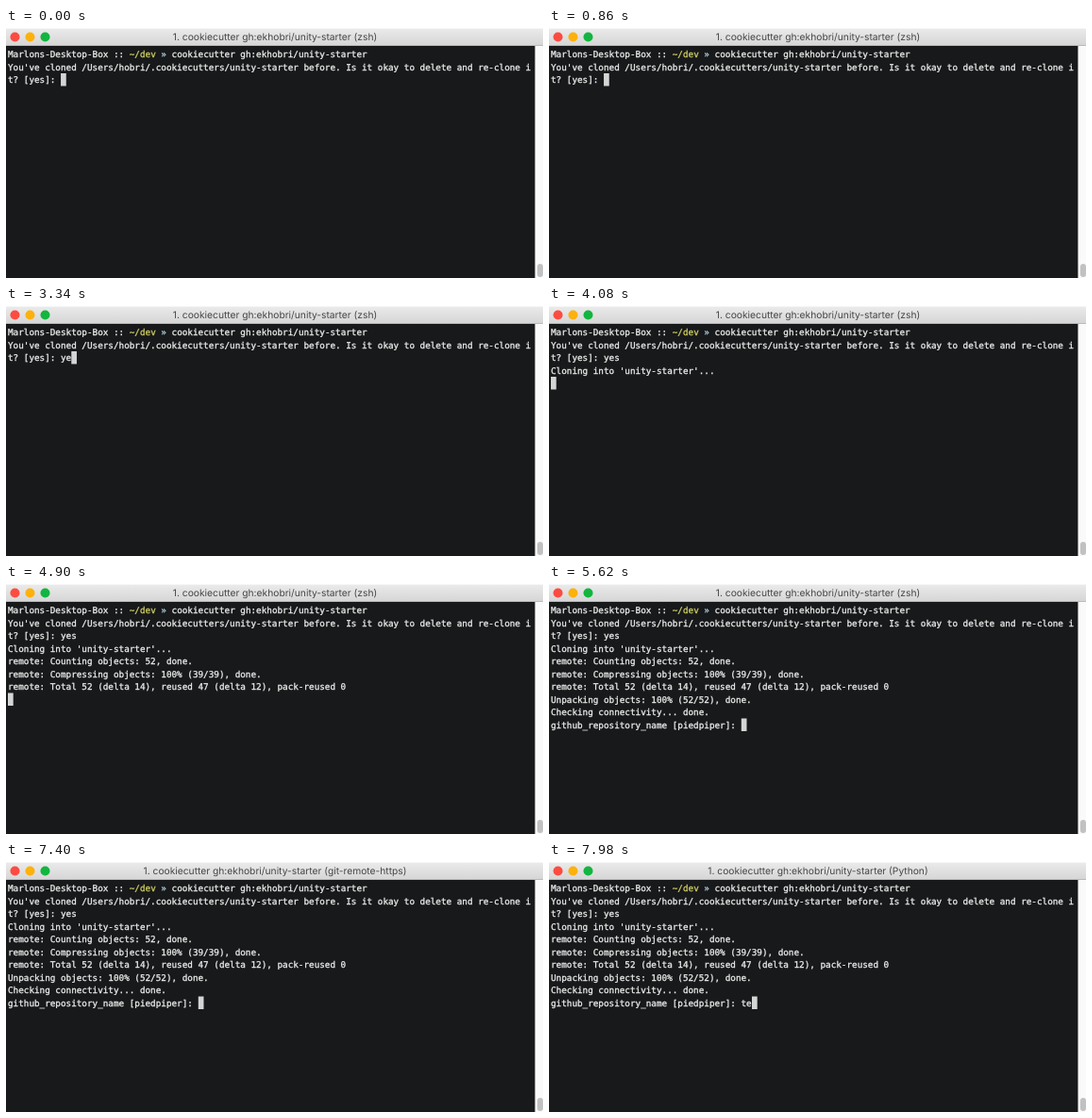
Animation of 569 by 265 pixels, one loop 8 s. Source, as an HTML page:

```html
<!DOCTYPE html>
<html lang="en">
<head>
<meta charset="utf-8">
<title>Terminal</title>
<style>
  html, body { margin: 0; width: 100%; height: 100%; overflow: hidden; background: #fff; }
  svg { display: block; width: 569px; height: 265px; }
  text { white-space: pre; text-rendering: geometricPrecision; }
  #title { font: 10.25px Inter, sans-serif; fill: #454545; text-anchor: middle; }
  #screen { font: 9.31px "DejaVu Sans Mono", monospace; stroke-width: .3; }
  #screen, .plain { fill: #eceeec; stroke: #eceeec; }
  .path { fill: #cdcd62; stroke: #cdcd62; }
  .arrow { fill: #a9cbdd; stroke: #a9cbdd; }
</style>
</head>
<body>
<svg viewBox="0 0 569 265">
  <defs>
    <linearGradient id="bar" x2="0" y2="1">
      <stop stop-color="#ebebeb"/>
      <stop offset="1" stop-color="#d5d5d5"/>
    </linearGradient>
  </defs>
  <rect y="18" width="569" height="247" fill="#18191b"/>
  <rect x="560.5" y="19" width="8.5" height="246" fill="#fafafa"/>
  <rect x="563" y="250" width="6" height="14" rx="3" fill="#c1c1c1"/>
  <rect width="569" height="19" fill="url(#bar)"/>
  <path d="M0 .5H569" stroke="#f7f7f7"/>
  <path d="M0 18.5H569" stroke="#b9b9b9"/>
  <circle cx="9.5" cy="9.5" r="5" fill="#fc4b41"/>
  <circle cx="25.5" cy="9.5" r="5" fill="#fdb10a"/>
  <circle cx="41.5" cy="9.5" r="5" fill="#12b53f"/>
  <text id="title" x="285" y="13.3"></text>
  <rect id="cursor" width="5.7" height="13.5" fill="#d3d6d4"/>
  <g id="screen"></g>
</svg>
<script>
const DURATION = 8000, LEFT = 2, TOP = 21, CELL = 5.605, ROW = 13.5, BASELINE = 10.3;
const SVG = 'http://www.w3.org/2000/svg';
const command = 'cookiecutter gh:ekhobri/unity-starter';
const prompt = `Marlons-Desktop-Box :: ~/dev » ${command}`;
const question = "You've cloned /Users/hobri/.cookiecutters/unity-starter before. Is it okay to delete and re-clone i";
const accents = { '~/dev': 'path', '»': 'arrow' };

// Output appended to the terminal: [time, text]
const output = [
  [0, `${prompt}\n${question}\nt? [yes]: `],
  [3180, 'y'],
  [3320, 'e'],
  [3440, 's'],
  [3640, "\nCloning into 'unity-starter'...\n"],
  [4280, 'remote: Counting objects: 52, done.\n'],
  [4360, 'remote: Compressing objects: 100% (39/39), done.\n'],
  [4500, 'remote: Total 52 (delta 14), reused 47 (delta 12), pack-reused 0\n'],
  [5040, 'Unpacking objects: 100% (52/52), done.\n'],
  [5120, 'Checking connectivity... done.\n'],
  [5260, 'github_repository_name [piedpiper]: '],
  [7640, 't'],
  [7800, 'e']
];
const processes = [[0, 'zsh'], [6060, 'git-remote-https'], [7600, 'Python']];

const byId = id => document.getElementById(id);
const title = byId('title'), screen = byId('screen'), cursor = byId('cursor');

function make(tag, attributes, text = '') {
  const node = document.createElementNS(SVG, tag);
  for (const name in attributes) node.setAttribute(name, attributes[name]);
  node.textContent = text;
  return node;
}

const rows = Array.from({ length: 10 }, (_, i) =>
  screen.appendChild(make('text', { x: LEFT, y: TOP + i * ROW + BASELINE })));

function setRow(row, text) {
  const parts = text.split(/(~\/dev|»)/);
  row.replaceChildren(...parts.map(part =>
    make('tspan', { class: accents[part] || 'plain' }, part)));
}

let shown = '';
function render(time) {
  const past = steps => steps.filter(([start]) => start <= time).map(step => step[1]);
  const text = past(output).join('');
  const process = past(processes).pop();
  if (shown === text + process) return;
  shown = text + process;

  const lines = text.split('\n');
  rows.forEach((row, i) => setRow(row, lines[i] || ''));
  const last = lines.length - 1;
  cursor.setAttribute('x', LEFT + lines[last].length * CELL);
  cursor.setAttribute('y', TOP + last * ROW);
  title.textContent = `1. ${command} (${process})`;
}

const start = performance.now();
function tick() {
  render((performance.now() - start) % DURATION);
  requestAnimationFrame(tick);
}
tick();
</script>
</body>
</html>
```
